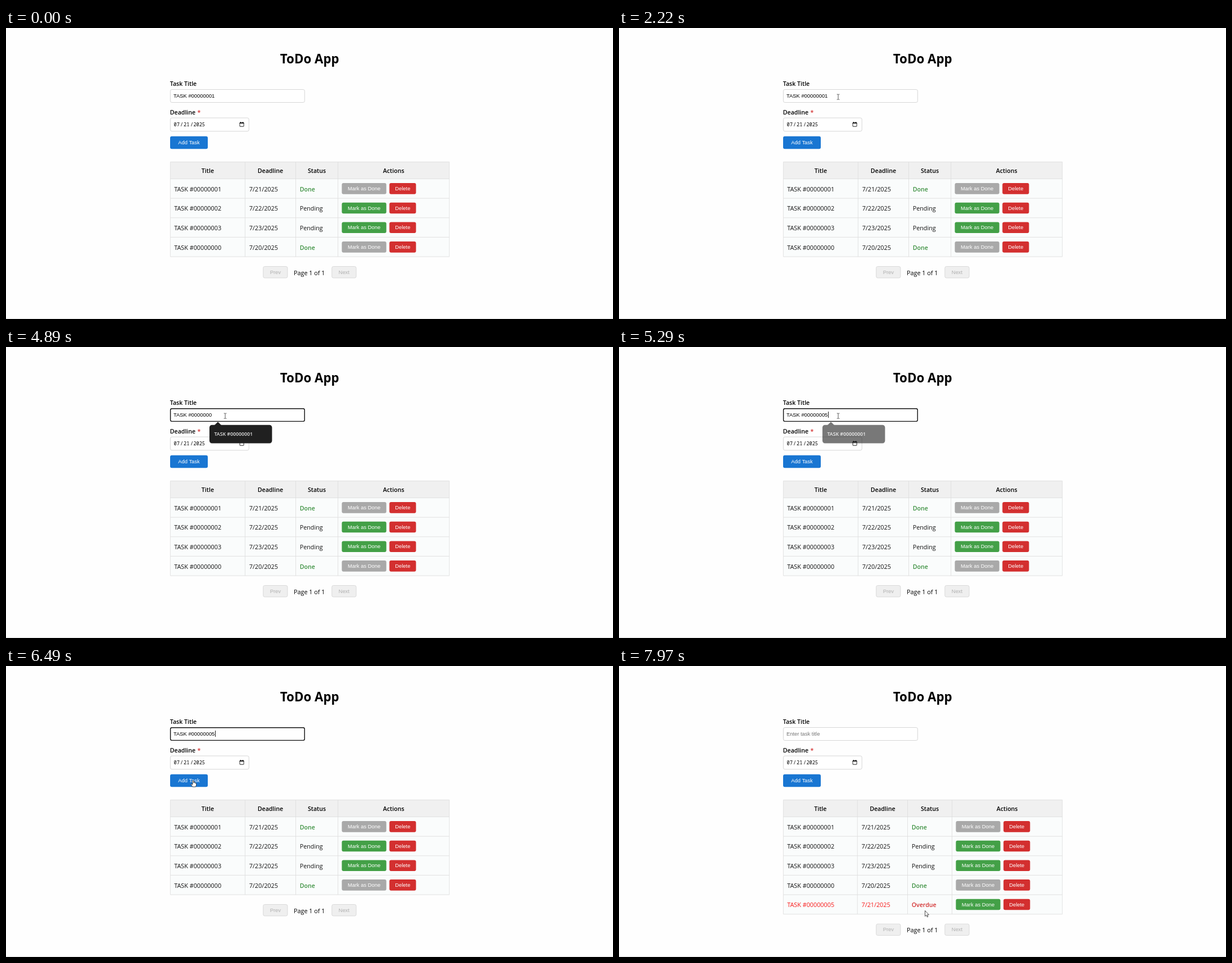
These frames come from a looping animation (1080 by 518 pixels, 8 s). An HTML page:

```html
<!DOCTYPE html>
<html lang="en">
<head>
<meta charset="utf-8">
<title>ToDo App</title>
<style>
  html, body { margin: 0; width: 100%; height: 100%; overflow: hidden; background: #fefefe; }
  svg { display: block; width: 100vw; height: 100vh; }
  text { white-space: pre; }
  .ui { font: 10.8px "Open Sans", "Noto Sans", sans-serif; }
  .bold { font: 600 10.6px "Open Sans", "Noto Sans", sans-serif; }
  .form { font: 9.4px "Liberation Sans", Arial, sans-serif; }
  .mono { font: 8.6px "Noto Sans Mono", "DejaVu Sans Mono", monospace; }
  .mid { text-anchor: middle; }
</style>
</head>
<body>
<svg id="stage" viewBox="0 0 1080 518"></svg>
<script>
const GREEN = '#43a047', RED = '#d32f2f', GRAY = '#a9a9a9', ROW = 34.65;

const text = (x, y, str, cls, fill = '#000', extra = '') =>
  `<text x="${x}" y="${y}" class="${cls}" fill="${fill}" ${extra}>${str}</text>`;
const box = (x, y, w, h, fill, stroke = 'none', r = 0, extra = '') =>
  `<rect x="${x}" y="${y}" width="${w}" height="${h}" rx="${r}" fill="${fill}" stroke="${stroke}" ${extra}/>`;
const button = (x, y, w, h, label, fill) =>
  box(x, y, w, h, fill, 'none', 3) + text(x + w / 2, y + h / 2 + 3, label, 'form mid', '#fff');
const field = (y, w, h) => box(292.4, y, w, h, '#fff', '#ccc', 2.8, 'stroke-width=".8"');

function pager(y) {
  const page = (x, label) => box(x, y, 43.3, 20.4, '#efefef', '#d3d3d3', 2.8, 'stroke-width=".8"') +
    text(x + 21.7, y + 13.2, label, 'form mid', '#b0b0b0');
  return page(457.6, 'Prev') + text(512, y + 15.2, 'Page 1 of 1', 'ui') + page(579.8, 'Next');
}

// cols: left edges of the four columns and the right edge of the table
function table(cols, rows) {
  const bottom = 268.5 + rows.length * ROW;
  let s = box(292.4, 238.4, 496.4, bottom - 238.4, '#fafcfc') + box(292.4, 238.4, 496.4, 30, '#f0f0f0');
  ['Title', 'Deadline', 'Status', 'Actions'].forEach((h, i) =>
    s += text((cols[i] + cols[i + 1]) / 2, 258.3, h, 'bold mid'));
  let lines = '';
  for (const x of cols) lines += `M${x} 238.4V${bottom}`;
  lines += 'M292.4 238.4H788.8';
  for (let i = 0; i <= rows.length; i++) lines += `M292.4 ${268.5 + i * ROW}H788.8`;
  s += `<path d="${lines}" stroke="#ddd" stroke-width=".85" fill="none"/>`;
  rows.forEach(([id, date, status], i) => {
    const y = 290.7 + i * ROW, top = 276.1 + i * ROW;
    const late = status === 'Overdue', done = status === 'Done';
    const ink = late ? '#f81818' : '#111';
    s += text(cols[0] + 6.9, y, 'TASK #0000000' + id, 'ui', ink) +
      text(cols[1] + 7.3, y, `7/${date}/2025`, 'ui', ink) +
      text(cols[2] + 7.2, y, status, late || done ? 'bold' : 'ui', late ? RED : done ? '#388e3c' : '#111') +
      button(cols[3] + 6.9, top, 79.2, 19.6, 'Mark as Done', done ? GRAY : GREEN) +
      button(cols[3] + 91.6, top, 47.3, 19.6, 'Delete', RED);
  });
  return s + pager(bottom + 17.4);
}

const tasks = [[1, 21, 'Done'], [2, 22, 'Pending'], [3, 23, 'Pending'], [0, 20, 'Done']];
const group = (id, body) => `<g id="${id}">${body}</g>`;

stage.innerHTML =
  box(0, 0, 1080, 518, '#fefefe') + box(0, 516.8, 1080, 1, '#e2e2e2') +
  text(540.2, 62.6, 'ToDo App', 'mid', '#000', 'style="font:700 22.3px \'Open Sans\',\'Noto Sans\',sans-serif"') +
  text(291.8, 103.3, 'Task Title', 'bold') + field(109.5, 239, 23) +
  text(298, 123.8, '', 'form', '#000', 'id="title"') +
  text(291.8, 153.8, 'Deadline', 'bold') + text(340.6, 153.8, '*', 'bold', RED) +
  field(160, 139.8, 23.8) +
  [[298.5, '07'], [310, '/'], [316, '21'], [328, '/'], [333.4, '2025']].map(([x, s]) => text(x, 174.8, s, 'mono')).join('') +
  box(416, 168.6, 7, 6.7, 'none', '#111', .5, 'stroke-width=".9"') +
  '<path d="M415.6 169.3h7.8M417.5 167v2M421.5 167v2" stroke="#111" stroke-width="1.3"/>' +
  button(292, 192.8, 67, 22.4, 'Add Task', '#1976d2') +
  group('before', table([292.4, 425.4, 515.5, 590.6, 788.8], tasks)) +
  group('after', table([292.4, 424.2, 513.5, 592.5, 788.8], [...tasks, [5, 21, 'Overdue']])) +
  group('focus', box(292.6, 109.7, 238.6, 22.7, 'none', '#101010', 2.6, 'stroke-width="1.4"')) +
  group('caret', box(0, 115, .9, 11, '#000')) +
  group('popup', box(361.6, 139.6, 112, 33, '#000', 'none', 5, 'opacity=".12"') +
    box(362, 138.7, 111.3, 32.6, '#202020', 'none', 4.5) + '<path d="M371 139l6-5.8 6 5.8z" fill="#202020"/>' +
    text(370.5, 158, 'TASK #00000001', 'bold', '#e6e6e6', 'style="font-size:8.75px"')) +
  group('arrow', '<path d="M0 0V10L2.3 8 3.8 11.4 5.3 10.8 3.9 7.4H6.9Z" fill="#fff" stroke="#222" stroke-width=".8"/>') +
  group('beam', '<path d="M-2.3-4.6H-.6L0-4 .6-4.6H2.3M0-4V4M-2.3 4.6H-.6L0 4 .6 4.6H2.3" fill="none" stroke="#444" stroke-width=".9"/>') +
  group('hand', '<path d="M-1 .6Q0-.8 1 .6V4.2Q2-.0 3 3.6V4.4Q4 3.2 4.7 4.8 5.6 4.4 5.6 5.8V8.2L4.4 11H-1.1L-3.6 7.2Q-3.6 5.6-2.2 6.2L-1 7.3Z" fill="#fff" stroke="#222" stroke-width=".8"/>');

const $ = id => document.getElementById(id);
const show = (id, on) => $(id).style.display = on ? '' : 'none';
const within = (t, spans) => spans.some(([a, b]) => t >= a && t < b);

// Pointer trips: start, end, number of steps, points passed
const trips = [
  [450, 590, 3, [[496, 392], [496, 392], [548, 262], [576, 169]]],
  [870, 1670, 13, [[576, 169], [480, 238], [340, 246], [211, 200], [270, 140], [340, 118], [420, 150]]],
  [1760, 2220, 7, [[420, 150], [436, 163], [415, 140], [390, 122.7]]],
  [5750, 6490, 12, [[390, 122.7], [430, 117], [447, 145], [385, 185], [333, 204]]],
  [7020, 7760, 12, [[333, 204], [460, 250], [630, 330], [645, 420], [590, 476], [551, 415]]],
  [7830, 7970, 3, [[551, 415], [549, 424], [544.5, 435.5]]]
];

function spline(pts, u) {
  const last = pts.length - 1, i = Math.min(last - 1, Math.floor(u * last)), f = u * last - i;
  const at = k => pts[Math.max(0, Math.min(last, k))];
  return [0, 1].map(c => {
    const [a, b, d, e] = [at(i - 1)[c], at(i)[c], at(i + 1)[c], at(i + 2)[c]];
    return b + f / 2 * (d - a + f * (2 * a - 5 * b + 4 * d - e + f * (3 * (b - d) + e - a)));
  });
}

function pointer(t) {
  const trip = trips.filter(p => t >= p[0]).pop();
  if (!trip) return null;
  const [start, end, n, pts] = trip;
  const step = Math.floor((t - start) / (end - start) * (n - 1) + 1e-6) + 1;
  return spline(pts, Math.min(1, step / n));
}

function shape([x, y]) {
  if (x > 292 && x < 532 && y > 109 && y < 133) return 'beam';
  if (x > 292 && x < 359 && y > 193 && y < 215) return 'hand';
  return 'arrow';
}

function draw(t) {
  const added = t >= 6690, short = t >= 3610 && t < 5220;
  show('before', !added);
  show('after', added);
  $('title').textContent = added ? 'Enter task title' : 'TASK #0000000' + (short ? '' : t < 3610 ? '1' : '5');
  $('title').setAttribute('fill', added ? '#757575' : '#000');
  show('focus', t >= 2300 && t < 6560);
  show('caret', within(t, [[2300, 2820], [3280, 3810], [4340, 4890], [5220, 5950], [6480, 6560]]));
  $('caret').setAttribute('transform', `translate(${short ? 366.4 : 372.1})`);
  $('popup').style.opacity = t < 3690 || t >= 5420 ? 0 : t < 5290 ? 1 : t < 5360 ? .6 : .3;
  const p = pointer(t), kind = p && shape(p);
  for (const id of ['arrow', 'beam', 'hand']) {
    show(id, id === kind);
    if (id === kind) $(id).setAttribute('transform', `translate(${p})`);
  }
}

const origin = performance.now();
function tick() {
  draw((performance.now() - origin) % 8000);
  requestAnimationFrame(tick);
}
tick();
</script>
</body>
</html>
```
